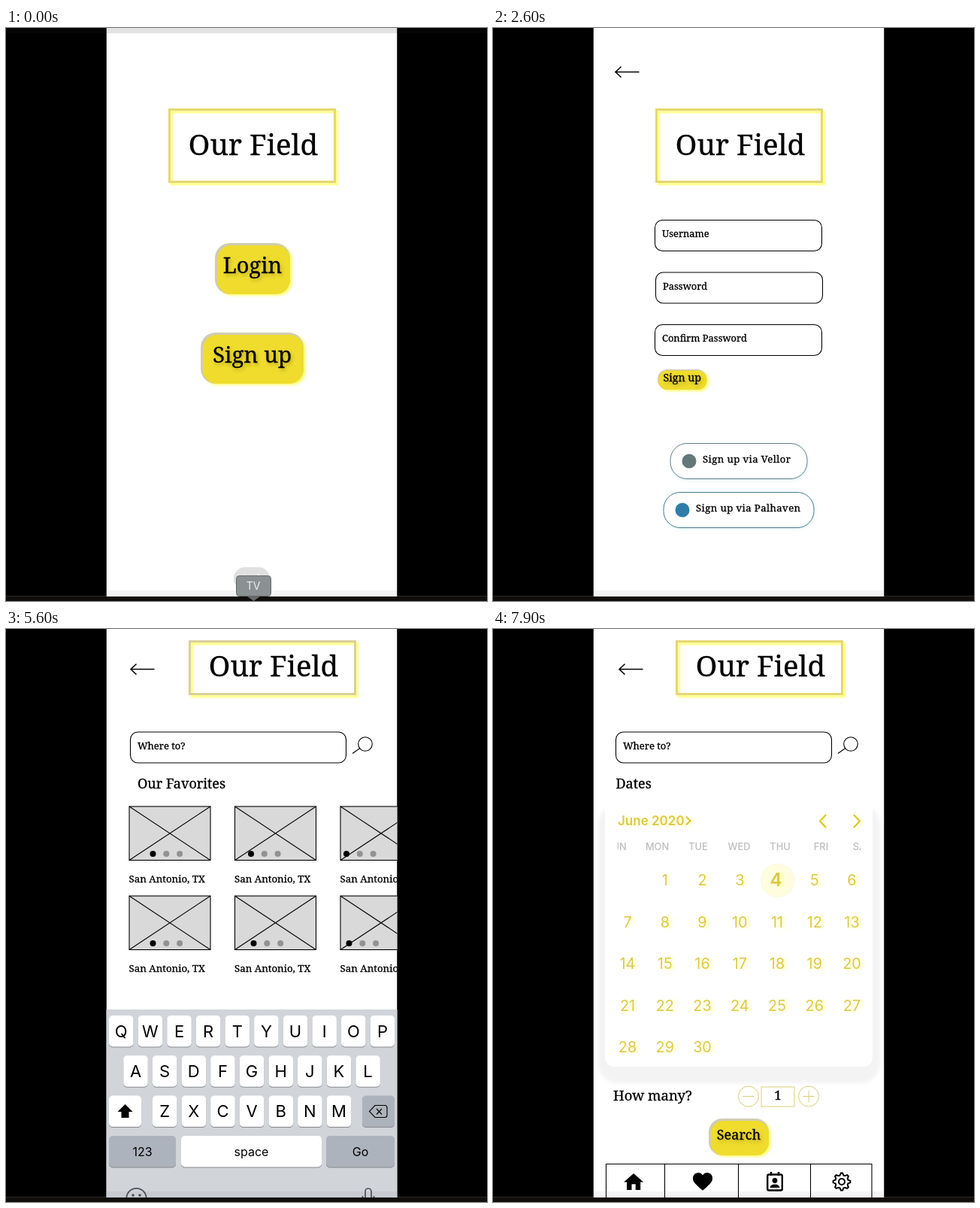
Write an HTML page that moves like this. It is 640 px wide and 762 px high and loops after 8000 ms.

```html
<!DOCTYPE html>
<html lang="en">
<head>
<meta charset="utf-8">
<title>App walkthrough</title>
<style>
  html, body { margin: 0; width: 100%; height: 100%; overflow: hidden; background: #000; }
  svg { display: block; width: 100vw; height: 100vh; }
  text { font-family: "Noto Serif", serif; stroke: #000; stroke-width: .3; }
  .sans { font-family: Inter, "Liberation Sans", sans-serif; stroke: none; }
  .mid { text-anchor: middle; }
  .line { fill: none; stroke: #000; stroke-width: 1.1; }
  .frame { fill: none; stroke-width: 3; filter: drop-shadow(3px 3px 1px #ffff70); }
  .button { filter: drop-shadow(3px 2px 1.5px #ffff70); }
  .raised { filter: drop-shadow(2px 3px 2px rgba(90, 80, 10, .3)); }
  .social { fill: #fff; stroke-width: 1; filter: drop-shadow(1px 2px 2px #e6f6f6); }
  .gold { fill: #dcc84a; filter: drop-shadow(4px 1px 2px #ffffa0); }
  .goldLine { fill: none; stroke: #dcc532; stroke-width: 2.1; filter: drop-shadow(3px 1px 2px #ffffa0); }
  .thinGold { fill: #fff; stroke: #d9cf78; stroke-width: 1; }
  .key { filter: drop-shadow(0 1px 0 #85888d); }
</style>
</head>
<body>
<svg viewBox="0 0 640 762" preserveAspectRatio="none">
  <defs>
    <clipPath id="phoneClip"><rect x="133.5" width="387" height="756"/></clipPath>
    <clipPath id="weekClip"><rect x="165.5" y="275" width="323.5" height="30"/></clipPath>
  </defs>
  <rect width="640" height="762" fill="#000"/>
  <rect y="755" width="640" height="7" fill="#110d0b"/>
  <path d="M0 755.5H640" stroke="#2c2a29"/>
  <g clip-path="url(#phoneClip)">
    <rect x="133.5" width="387" height="756" fill="#fff"/>
    <g id="welcome"></g>
    <g id="signup"></g>
    <g id="search"></g>
    <g id="dates"></g>
    <rect x="133" y="748" width="388" height="8" opacity=".045"/>
  </g>
  <g id="controls">
    <rect width="640" height="7" fill="#2b2b2b"/>
    <rect x="303" y="717" width="48" height="30" rx="15" fill="#1b1b1b"/>
    <path d="M318.5 726L312 732.5L318.5 739" fill="none" stroke="#777" stroke-width="1.3"/>
    <path d="M335 726L341.5 732.5L335 739" fill="none" stroke="#fff" stroke-width="1.6"/>
  </g>
  <g id="tooltip">
    <path d="M321 756H338L329.5 762Z" fill="#65696b"/>
    <rect x="306.5" y="728.5" width="46" height="27" rx="4" fill="#8b9092" stroke="#65696b"/>
    <text class="sans mid" x="329" y="747" font-size="14" fill="#eee">TV</text>
  </g>
</svg>
<script>
const LOOP = 8000, SCROLL = 33.7;
const byId = id => document.getElementById(id);

const text = (x, y, size, str, cls = '', extra = '') =>
  `<text x="${x}" y="${y}" font-size="${size}" class="${cls}" ${extra}>${str}</text>`;
const rect = (x, y, w, h, r, cls = '', extra = '') =>
  `<rect x="${x}" y="${y}" width="${w}" height="${h}" rx="${r}" class="${cls}" ${extra}/>`;
const circle = (x, y, r, cls = '', extra = '') =>
  `<circle cx="${x}" cy="${y}" r="${r}" class="${cls}" ${extra}/>`;
const path = (d, cls = '', extra = '') => `<path d="${d}" class="${cls}" ${extra}/>`;

const title = (x, y, h, color, baseline) =>
  rect(x + 1.5, y + 1.5, 220, h - 3, 0, 'frame', `stroke="${color}"`) +
  text(x + 113, baseline, 38.5, 'Our Field', 'mid');

const button = (x, y, w, h, r, edge, size, baseline, label) =>
  `<g class="button">${rect(x, y, w, h, r, '', 'fill="#d0ccb4"')}` +
  `${rect(x + edge, y + edge, w - edge, h - edge, r - 1, '', 'fill="#efdc2d"')}</g>` +
  text(x + w / 2, baseline, size, label, 'mid raised');

const backArrow = (x, y) =>
  path(`M${x + 31.5} ${y}H${x}M${x + 7.5} ${y - 7}L${x} ${y}L${x + 7.5} ${y + 7}`, 'line', 'style="stroke-width:1.6"');

const searchField = x =>
  rect(x, 137, 287, 41, 10, 'line') + text(x + 9.5, 159.5, 13, 'Where to?') +
  circle(x + 312.5, 153, 9.3, 'line') + path(`M${x + 295.5} 165.5L${x + 305.5} 158.5`, 'line');

function welcomeScreen() {
  return title(216, 107, 99, '#e6d774', 168.8) +
    button(278, 286, 100, 68, 20, 3, 29, 325.5, 'Login') +
    button(259, 405, 137, 68, 20, 3, 29.6, 444.5, 'Sign up');
}

function signupScreen() {
  const field = (x, y, label) => rect(x, y, 222, 41, 10, 'line') + text(x + 9.5, y + 22.5, 12.9, label);
  const social = (x, y, w, color, dot, label) =>
    rect(x, y, w, 47, 22, 'social', `stroke="${color}"`) +
    circle(x + 25, y + 23.5, 9.5, '', `fill="${dot}"`) +
    text(x + 43, y + 25.5, 13.2, label, '', 'letter-spacing=".4"');
  return backArrow(163, 58.5) + title(216, 107, 99, '#e6d774', 168.8) +
    field(215.5, 255.5, 'Username') + field(216.5, 325, 'Password') + field(215.5, 394.5, 'Confirm Password') +
    button(219, 454, 65.5, 27, 13, 1.5, 14.2, 469.5, 'Sign up') +
    social(236, 552.5, 182, '#5c7d88', '#64777a', 'Sign up via Vellor') +
    social(227, 617.5, 200, '#437a94', '#2e7da8', 'Sign up via Palhaven');
}

function cards() {
  let out = '';
  const dotStarts = [[31.5, 21.5, 8], [31.5, 25, 11.5]];
  dotStarts.forEach((starts, row) => starts.forEach((start, col) => {
    const x = 164 + 140.5 * col, y = 236 + 119 * row;
    out += rect(x, y, 108, 71.5, 0, 'line', 'style="fill:#d9d9d9"') +
      path(`M${x} ${y}l108 71.5M${x} ${y + 71.5}l108 -71.5`, 'line');
    for (let i = 0; i < 3; i++)
      out += circle(x + start + 17.8 * i, y + 63, 4, '', `fill="${i ? '#929292' : '#000'}"`);
    out += text(x - .5, y + 100.5, 13.3, 'San Antonio, TX');
  }));
  return out;
}

function keyboard() {
  const key = (x, y, w, label, size = 22, fill = '#fff') =>
    rect(x, y, w, 41.5, 5, 'key', `fill="${fill}"`) +
    text(x + w / 2, y + 20.8 + size * .364, size, label, 'sans mid');
  const grey = '#adb3bc';
  let out = rect(133, 506, 388, 250, 0, '', 'fill="#d1d4d9"');
  [['QWERTYUIOP', 137], ['ASDFGHJKL', 156.3], ['ZXCVBNM', 195]].forEach(([letters, x], row) =>
    [...letters].forEach((c, i) => out += key(x + 38.63 * i, 514 + 53.3 * row, 32.5, c)));
  return out + key(137, 620.6, 43, '') + key(474, 620.6, 43, '', 22, grey) +
    key(137, 674, 89, '123', 16, grey) + key(233, 674, 187, 'space', 16) + key(426, 674, 91, 'Go', 16, grey) +
    path('M158.5 632L168.5 642H163.5V650H153.5V642H148.5Z') +
    path('M491 633.5H504Q507 633.5 507 636.5V646.5Q507 649.5 504 649.5H491L483.5 641.5ZM493 638L500 645.5M500 638L493 645.5', 'line') +
    `<g fill="none" stroke="#50545a" stroke-width="1.7">${circle(173.5, 757, 13.2)}` +
    `${rect(478, 744, 8, 18, 4)}${path('M474.5 754V762M489.5 754V762')}</g>` +
    circle(169, 753, 1.8, '', 'fill="#50545a"') + circle(178, 753, 1.8, '', 'fill="#50545a"');
}

function searchScreen() {
  return backArrow(166, 53.5) + title(243, 15, 73, '#d9d09a', 62.8) + searchField(165.5) +
    text(175, 211.5, 18, 'Our Favorites') + `<g id="carousel">${cards()}</g>` + keyboard();
}

function calendar() {
  let out = rect(140, 234, 375, 370, 26, '', 'fill="#f3f3f3" style="filter:blur(2.5px)"') +
    rect(149, 229, 356, 353, 12, '', 'fill="#fff"') +
    text(166, 261, 17, 'June 2020', 'sans gold', 'font-weight="600"') +
    path('M257 249.5L262.5 255L257 260.5M443 247L435 255.5L443 264M480 247L488 255.5L480 264', 'goldLine');
  const week = ['SUN', 'MON', 'TUE', 'WED', 'THU', 'FRI', 'SAT'];
  out += `<g clip-path="url(#weekClip)" fill="#bdbdbd" font-weight="500">${
    week.map((d, i) => text(164 + 54.5 * i, 294, 12.8, d, 'sans mid')).join('')}</g>`;
  out += circle(379, 334.5, 21.5, '', 'fill="#fffde0" style="filter:drop-shadow(0 0 1px #f4ecae)"');
  for (let day = 1; day <= 30; day++) {
    const x = 179 + 49.75 * (day % 7), y = 341 + 55.6 * Math.floor(day / 7);
    out += day === 4
      ? text(x - 1.5, y + 1, 24, day, 'sans mid gold', 'font-weight="600"')
      : text(x, y, 19.8, day, 'sans mid gold');
  }
  return out;
}

function gear(cx, cy) {
  const points = [];
  for (let i = 0; i < 32; i++) {
    const r = i % 4 < 2 ? 11.5 : 8.7, a = (i - .5) * Math.PI / 16;
    points.push(`${(cx + r * Math.cos(a)).toFixed(1)} ${(cy + r * Math.sin(a)).toFixed(1)}`);
  }
  return `<g fill="none" stroke="#000" stroke-width="2">${path(`M${points.join('L')}Z`)}${circle(cx, cy, 4)}</g>`;
}

function navigation() {
  return path('M150.5 756V711.5H504V756M228.5 711V756M326.5 711V756M422.5 711V756', 'line') +
    path('M10 20V14H14V20H19V12H22L12 3L2 12H5V20Z', '', 'transform="translate(171.5 720) scale(1.3)"') +
    path('M12 21C4 14 2 12 2 8.5A5.5 5.5 0 0 1 12 5.1A5.5 5.5 0 0 1 22 8.5C22 12 20 14 12 21Z', '', 'transform="translate(263.4 719.5) scale(1.3)"') +
    rect(365.2, 725.5, 19.6, 21, 2, 'line', 'style="stroke-width:2.4"') +
    path('M370 722V727M380 722V727', 'line', 'style="stroke-width:2.6"') +
    circle(375, 733.5, 3.4) + path('M368.5 743Q369 738.5 375 738.5Q381 738.5 381.5 743Z') +
    gear(464, 735);
}

function datesScreen() {
  return backArrow(168, 53.5) + title(243, 15, 73, '#e6d774', 62.8) + searchField(163.5) +
    calendar() + text(163.5, 211.5, 18, 'Dates') + text(160, 627, 18.5, 'How many?') +
    circle(340, 621.5, 13.5, 'thinGold') + circle(420, 621.5, 13.5, 'thinGold') +
    rect(357, 609, 44, 26, 0, 'thinGold') +
    path('M332 621.5H348M412 621.5H428M420 613.5V629.5', 'thinGold') +
    text(379, 626, 17, '1', 'mid') +
    button(287, 651, 80, 49, 18, 3, 18, 679, 'Search') + navigation();
}

const screens = [
  { id: 'welcome', start: 0, end: 1800, draw: welcomeScreen },
  { id: 'signup', start: 1800, end: 3700, draw: signupScreen },
  { id: 'search', start: 3700, end: 7700, draw: searchScreen },
  { id: 'dates', start: 7700, end: LOOP, draw: datesScreen }
];
screens.forEach(s => byId(s.id).innerHTML = s.draw());

// Progress from 0 to 1 between two times.
const ramp = (t, from, to) => Math.min(1, Math.max(0, (t - from) / (to - from)));
const ease = p => p * p * (3 - 2 * p);

function render(now) {
  const t = Math.floor(now % LOOP / 100) * 100; // ten pictures a second
  screens.forEach(s => byId(s.id).style.display = t >= s.start && t < s.end ? '' : 'none');
  byId('controls').style.opacity = (.13 + .87 * ramp(t, 0, 300)) * (1 - ramp(t, 1700, 2000));
  byId('tooltip').style.opacity = 1 - ramp(t, 0, 300);
  const offset = SCROLL * (ease(ramp(t, 5700, 6100)) - ease(ramp(t, 6700, 6900)));
  byId('carousel').setAttribute('transform', `translate(${-offset} 0)`);
}

const began = performance.now();
(function tick() {
  render(performance.now() - began);
  requestAnimationFrame(tick);
})();
</script>
</body>
</html>
```
